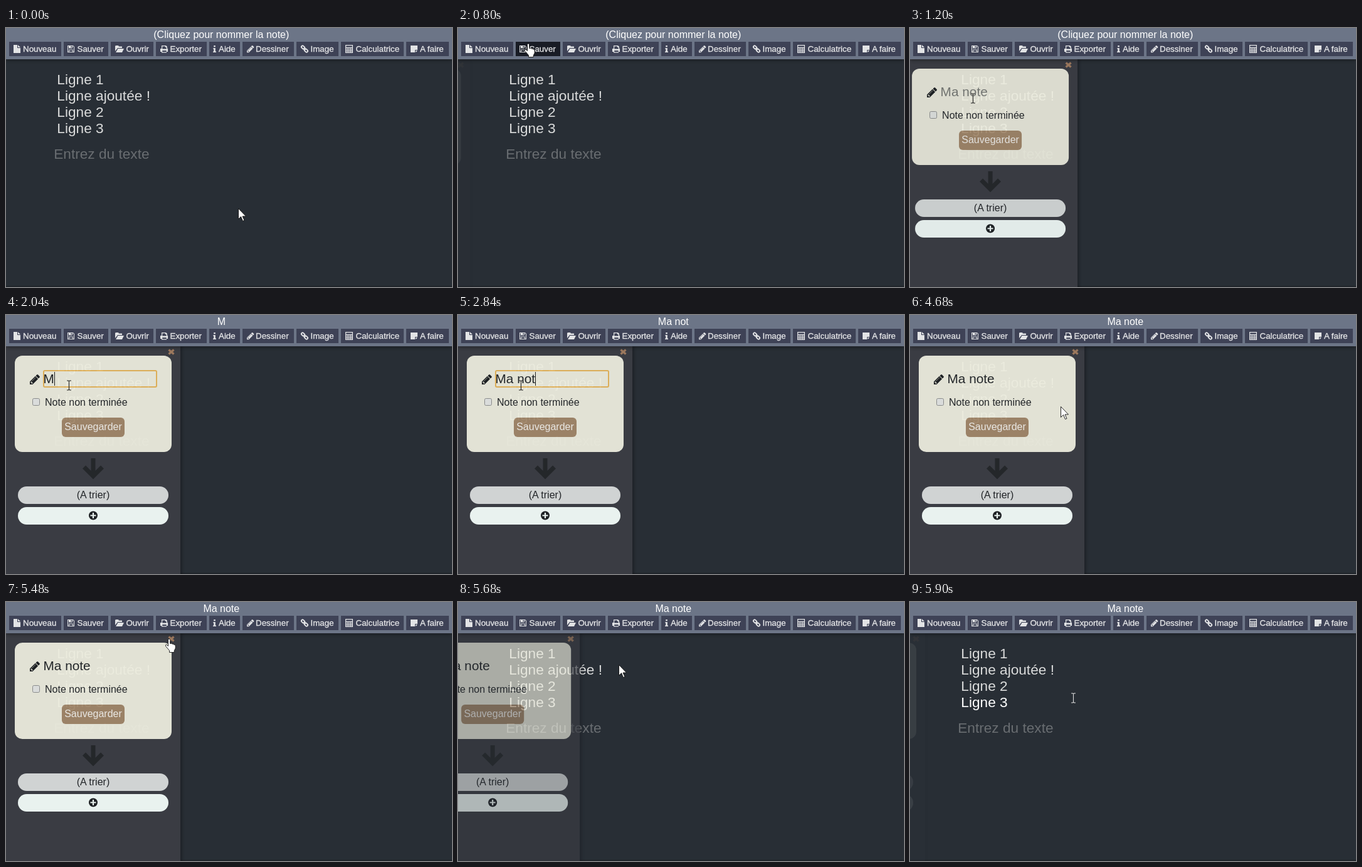
These frames come from a looping animation (711 px wide and 414 px high, 6.1 s). An HTML page:

```html
<!DOCTYPE html>
<html lang="fr">
<head>
<meta charset="utf-8">
<title>Note</title>
<style>
  html, body { margin: 0; height: 100%; overflow: hidden; background: #282e35; }
  svg { display: block; width: 100vw; height: 100vh; font: 16px "Liberation Sans", Arial, sans-serif; }
  .lines { font-size: 22.67px; fill: #dadbdb; }
  .mid { text-anchor: middle; }
  #bar { filter: drop-shadow(0 1px 3px #0007); }
  #side { filter: drop-shadow(1px 0 3px #0007); }
  #buttons { font-size: 13.33px; fill: #e2e3e5; }
  #buttons text { stroke: #e2e3e5; stroke-width: .35px; }
  #buttons path { fill-rule: evenodd; }
  #name { font-size: 20.8px; }
</style>
</head>
<body>
<svg viewBox="0 0 711 414">
  <defs>
    <path id="pencil" d="M363 1536l91-91-235-235-91 91v107h128v128zM886 608q0-22-22-22-10 0-17 7l-542 542q-7 7-7 17 0 22 22 22 10 0 17-7l542-542q7-7 7-17zM832 416l416 416-832 832H0v-416zM1515 512q0 53-37 90l-166 166-416-416 166-165q36-38 90-38 53 0 91 38l235 234q37 39 37 91z"/>
  </defs>
  <rect width="711" height="414" fill="#282e35"/>
  <rect y="412" width="711" height="2" fill="#20252b"/>

  <g class="lines">
    <text x="81.3" y="90">Ligne 1</text>
    <text x="81.3" y="116">Ligne ajoutée !</text>
    <text x="81.3" y="142">Ligne 2</text>
    <text x="81.3" y="168" id="last">Ligne 3</text>
    <text x="76.2" y="209" fill="#696d71">Entrez du texte</text>
  </g>

  <g id="panel">
    <rect id="side" y="50" width="278" height="370" fill="#3b3d44"/>
    <path d="M259.5 55.5l8 7m0-7l-8 7" stroke="#a37d60" stroke-width="3.4"/>
    <rect x="14" y="65" width="250" height="154" rx="12" fill="#ececde"/>
    <use href="#pencil" transform="translate(38 93.5) scale(.0105)" fill="#1d2023"/>
    <rect id="field" x="60" y="89" width="180" height="26" rx="2" fill="none" stroke="#e5b45a" stroke-width="2"/>
    <text id="name" x="59.5" y="109"></text>
    <path id="caret" stroke="#222" d="M0 91v22"/>
    <rect x="42.5" y="133.5" width="11" height="11" rx="2" fill="#e4e6e4" stroke="#8f9190"/>
    <text x="62" y="145" fill="#222528">Note non terminée</text>
    <rect x="89" y="164" width="100" height="31" rx="6" fill="#a2876a"/>
    <text class="mid" x="139" y="184" fill="#f4f2ee">Sauvegarder</text>
    <path d="M139 229v28M124.5 243l14.5 14.5 14.5-14.5" fill="none" stroke="#24272a" stroke-width="7"/>
    <rect x="19" y="274" width="240" height="28" rx="14" fill="#d9dcdc"/>
    <text class="mid" x="139" y="293" fill="#222528">(A trier)</text>
    <rect x="19" y="307" width="240" height="28" rx="14" fill="#f4fdfa"/>
    <circle cx="139" cy="320.5" r="7" fill="#1d2023"/>
    <path d="M134.5 320.5h9m-4.500-4.500v9" stroke="#f4fdfa" stroke-width="2.200"/>
  </g>

  <rect id="bar" width="711" height="50" fill="#6c7587"/>
  <text id="title" class="mid" x="343.300" y="16" fill="#fff"></text>
  <g id="buttons"></g>

  <g id="cursor">
    <path id="arrow" d="M0 0v17l4-4 3 7 2.500-1-3-6.500h5.500z" fill="#fff" stroke="#111" stroke-width=".9"/>
    <path id="hand" d="M5 12V2a1.600 1.600 0 0 1 3.200 0v6q2.600-1 3 .6 2.500-.6 2.800 1 2.600-.4 2.700 1.800v4l-2 4V22H7v-3l-6-7q-.6-2.400 1.600-2.200z" fill="#fff" stroke="#111" stroke-width=".9"/>
    <path id="beam" d="M-3.500-7.500h2.500l1 1 1-1h2.500M0-6.500v13M-3.500 7.500h2.500l1-1 1 1h2.500" fill="none" stroke-width="1.100"/>
  </g>
</svg>
<script>
const $ = id => document.getElementById(id);
const set = (el, attrs) => { for (const k in attrs) el.setAttribute(k, attrs[k]); };
const show = (id, on) => set($(id), { visibility: on ? 'visible' : 'hidden' });

// label, left, right, text x, icon x, icon outline
const buttons = [
  ['Nouveau', 5, 88, 27, 12, 'M0 0h6v5h5v8H0zM7 0l4 4H7z'],
  ['Sauver', 92, 163, 113.500, 98, 'M0 1h9l2 2v9H0zM1 2v9h1V7.500h7V11h1V3.500L8.500 2H8v3.500H2V2zM3 8.500V11h5V8.500zM5.500 2v2.500H7V2z'],
  ['Ouvrir', 167, 235, 191.500, 174, 'M0 10V2l1-1h4l1 1.500h5V5H4zM4.500 6H14l-3 6H1z'],
  ['Exporter', 239, 320, 261.500, 246, 'M2 1h7l2 2v3h1v5h-2v1.500H2V11H0V6h2zM3.200 2.200V6.500h6.500V4H8V2.200zM3.200 9v2.300h6.500V9z'],
  ['Aide', 324, 373, 339, 330, 'M1.200 1h2.600v2.300H1.200zM.3 5h3.500v5.500H5V12H0v-1.500h1.200v-4H.3z'],
  ['Dessiner', 377, 459, 398, 384, ''],
  ['Image', 463, 530, 485.500, 470, ''],
  ['Calculatrice', 534, 634, 557.500, 541, 'M0 0h12v13H0zM1.200 1.200v2.500h9.600V1.200z' +
    [1.2, 3.7, 6.2, 8.9].map(x => [5, 7.6, 10.2].map(y => `M${x} ${y}h1.700v1.500h-1.700z`).join('')).join('')],
  ['A faire', 638, 706, 660, 645, 'M0 1h11v7H7v4H0zM8 9h3l-3 3z']
];
const icons = {
  Dessiner: '<use href="#pencil" transform="translate(0 -.2) scale(.0075)"/>',
  Image: `<g fill="none" stroke="#e2e3e5" stroke-width="1.900">
    <rect x="-3" y="-1.900" width="6" height="3.800" rx="1.900" transform="translate(3.600 4) rotate(45)"/>
    <rect x="-3" y="-1.900" width="6" height="3.800" rx="1.900" transform="translate(8.400 9) rotate(45)"/>
    <path d="M4.500 5l3 3"/></g>`
};
$('buttons').innerHTML = buttons.map(([label, l, r, tx, ix, d]) =>
  `<rect id="b${l}" x="${l}" y="22" width="${r - l}" height="23" fill="#3e4256"/>
   <text x="${tx}" y="38">${label}</text>
   <g transform="translate(${ix} 27)">${icons[label] || `<path d="${d}"/>`}</g>`).join('');

const LOOP = 6100;
// time at which the picture is refreshed, cursor shape, cursor place
const steps = [
  [0, 'arrow', 370, 288], [200, 'arrow', 312, 226], [400, 'arrow', 186, 96],
  [600, 'hand', 105, 24], [800, 'hand', 105, 24], [1020, 'arrow', 106, 76],
  [1200, 'beam', 100, 112], [1420, 'beam', 100, 112], [2040, 'beam', 100, 112],
  [2220, 'beam', 100, 112], [2420, 'beam', 100, 112], [2640, 'beam', 100, 112],
  [2840, 'beam', 100, 112], [3040, 'beam', 100, 112], [3460, 'arrow', 118, 128],
  [3660, 'hand', 160, 172], [3860, 'hand', 170, 181], [4060, 'hand', 170, 181],
  [4260, 'hand', 170, 181], [4680, 'arrow', 240, 146], [4880, 'arrow', 400, 56],
  [5080, 'arrow', 463, 6], [5280, 'arrow', 330, 52], [5480, 'hand', 253, 58],
  [5680, 'arrow', 256, 100], [5900, 'beam', 260, 153]
];
const typed = [[2040, 'M'], [2220, 'Ma'], [2420, 'Ma n'], [2640, 'Ma no'], [2840, 'Ma not'], [3040, 'Ma note']];

const at = (list, t) => list.findLast(item => item[0] <= t);
const swing = p => .5 - Math.cos(Math.PI * Math.min(1, Math.max(0, p))) / 2;

function draw(now) {
  const [t, shape, x, y] = at(steps, now % LOOP);
  const open = swing((t - 705) / 567) - swing((t - 5495) / 500);
  const text = (at(typed, t) || [0, ''])[1];

  set($('panel'), { transform: `translate(${278 * (open - 1)})`, opacity: .95 * open });
  $('title').textContent = text || '(Cliquez pour nommer la note)';
  $('name').textContent = text || 'Ma note';
  set($('name'), { fill: text ? '#222528' : '#777975' });
  show('field', t >= 1420 && t < 4260);
  show('caret', t >= 2040 && t < 3460);
  set($('caret'), { transform: `translate(${Math.round(59.5 + $('name').getComputedTextLength()) + .5})` });

  set($('b92'), { fill: t >= 600 && t < 1020 ? '#191c25' : '#3e4256' });
  set($('last'), { fill: t >= 5900 ? '#fff' : '#dadbdb' });

  for (const id of ['arrow', 'hand', 'beam']) show(id, id === shape);
  set($('beam'), { stroke: t >= 5900 ? '#dcdcdc' : '#222' });
  set($('cursor'), { transform: `translate(${x + .5} ${y + .5})` });
}

const start = performance.now();
function tick() {
  draw(performance.now() - start);
  requestAnimationFrame(tick);
}
tick();
</script>
</body>
</html>
```
